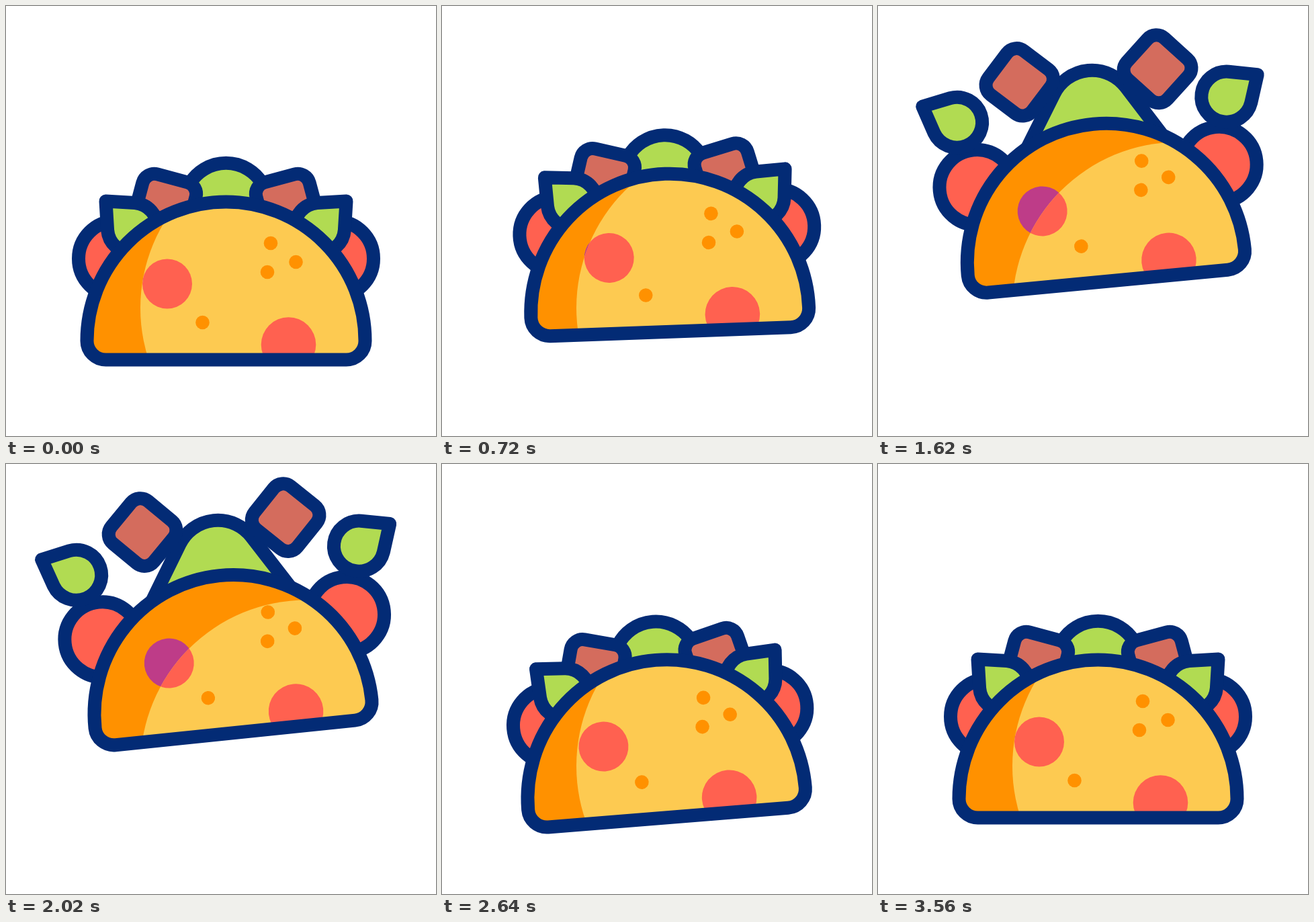
These frames come from a looping animation (640x640 px, 3.6 s). An HTML page with a canvas:

```html
<!DOCTYPE html>
<html lang="en">
<head>
<meta charset="utf-8">
<title>Jumping taco</title>
<style>
  html, body { margin: 0; width: 100%; height: 100%; overflow: hidden; background: #fff; }
  canvas { display: block; width: 640px; height: 640px; }
</style>
</head>
<body>
<canvas id="stage" width="640" height="640"></canvas>
<script>
const ctx = document.getElementById('stage').getContext('2d');
const LOOP = 3600;
const NAVY = '#032b75', YELLOW = '#fdca51', ORANGE = '#ff9100', RED = '#ff6150',
      PURPLE = '#be3c88', GREEN = '#b1db52', BROWN = '#d46c5d';

// Key moments in ms
const START = 40, CROUCHED = 450, LEAP = 480, RISING = 720, HOVER = 1080,
      FALL = 2085, LANDED = 2440, UPRIGHT = 2640;

const ramp = (t, from, to) => Math.min(1, Math.max(0, (t - from) / (to - from)));
const smooth = (t, from, to) => {
  const r = ramp(t, from, to);
  return r * r * (3 - 2 * r);
};
const easeOut = (t, from, to) => 1 - (1 - ramp(t, from, to)) ** 2;
const surge = (t, from, tau) => {
  const s = Math.max(0, t - from) / tau;
  return 1 - (1 + s) * Math.exp(-s);
};

// Offsets from rest: crouch, leap, drift in the air, fall and recover.
const shiftX = t => -28 * smooth(t, START, CROUCHED)
  + 36.6 * smooth(t, LEAP, RISING)
  - 8.6 * ramp(t, RISING, LANDED);

const shiftY = t => 74.5 * smooth(t, START, CROUCHED)
  - 178 * surge(t, LEAP, 108)
  - 24 * ramp(t, HOVER, FALL)
  + 155.5 * easeOut(t, FALL, LANDED)
  - 28 * smooth(t, LANDED, UPRIGHT);

const tilt = t => 8 * smooth(t, START, CROUCHED)
  - 10.07 * smooth(t, LEAP, RISING)
  - 3.8 * easeOut(t, RISING, FALL)
  + 11.97 * easeOut(t, FALL, LANDED)
  - 10.7 * smooth(t, LANDED, UPRIGHT)
  + 4.6 * smooth(t, 2740, 3260);

// How far the filling flies out: once in the air, once more after landing.
const spread = t => 0.78 * smooth(t, RISING + 15, HOVER)
  + 0.25 * ramp(t, HOVER, FALL)
  - 1.15 * easeOut(t, FALL, 2300)
  + 0.12 * smooth(t, LANDED, 2700)
  + 1.32 * (smooth(t, 2840, 3280) - smooth(t, 3300, 3540));

const curve = (u, lead) => lead * u + (1 - lead) * u * u;

function disc(x, y, r) {
  const path = new Path2D();
  path.arc(x, y, r, 0, 2 * Math.PI);
  return path;
}

const shell = new Path2D('M-207 87A207 207 0 0 1 207 87A28 28 0 0 1 179 115H-179A28 28 0 0 1 -207 87Z');
const lettuce = new Path2D('M-127.7 85.6L-53.5 -33.4A63 63 0 0 1 53.5 -33.4L127.7 85.6Z');
const leaf = new Path2D('M-40 -40L3 -37.4A37.5 37.5 0 1 1 -37.4 3Z');
const tomato = disc(0, 0, 56);
const meat = new Path2D();
meat.roundRect(-41, -41, 82, 82, 18);

const light = disc(447, 449.5, 247);   // stays still while the taco moves
const bigSpot = disc(-87.5, 2, 37);
const lowSpot = disc(93, 92.5, 40.8);
const dots = [[66.5, -58.5], [104, -30.5], [61.5, -15.5], [-35, 59.5]]
  .map(([x, y]) => disc(x, y, 10.3));

function fill(path, color) {
  ctx.fillStyle = color;
  ctx.fill(path);
}

function piece(path, color, x, y, degrees = 0) {
  ctx.save();
  ctx.translate(x, y);
  ctx.rotate(degrees * Math.PI / 180);
  fill(path, color);
  ctx.stroke(path);
  ctx.restore();
}

function pair(path, color, x, y, degrees) {
  for (const side of [1, -1]) {
    ctx.save();
    ctx.scale(side, 1);
    piece(path, color, x, y, degrees);
    ctx.restore();
  }
}

function drawFilling(u) {
  const lift = curve(Math.max(0, u), 1.9);
  piece(lettuce, GREEN, 0, -114.5 - 24.5 * u);
  pair(meat, BROWN, -90.5 + 10 * u - 26 * u * u, -115.5 - 80 * curve(u, 1.6), 15 + 30 * u);
  pair(tomato, RED, -163.5 - 19 * u, -35.5 - 7.5 * u);
  pair(leaf, GREEN, -139 - 71 * curve(u, 0.56), -81 - 61.5 * lift, -15 * lift);
}

function drawShell(pose) {
  ctx.save();
  ctx.clip(shell);
  fill(shell, ORANGE);
  fill(bigSpot, PURPLE);
  ctx.resetTransform();
  ctx.clip(light);
  ctx.setTransform(pose);
  fill(shell, YELLOW);
  fill(bigSpot, RED);
  fill(lowSpot, RED);
  dots.forEach(dot => fill(dot, ORANGE));
  ctx.restore();
  ctx.stroke(shell);
}

function draw(now) {
  const t = now % LOOP;
  ctx.resetTransform();
  ctx.fillStyle = '#fff';
  ctx.fillRect(0, 0, 640, 640);
  ctx.strokeStyle = NAVY;
  ctx.lineWidth = 20;
  ctx.lineJoin = 'round';
  ctx.translate(327.5 + shiftX(t), 411.5 + shiftY(t));
  ctx.rotate(tilt(t) * Math.PI / 180);
  drawFilling(spread(t));
  drawShell(ctx.getTransform());
}

const start = performance.now();
function tick() {
  draw(performance.now() - start);
  requestAnimationFrame(tick);
}
tick();
</script>
</body>
</html>
```
